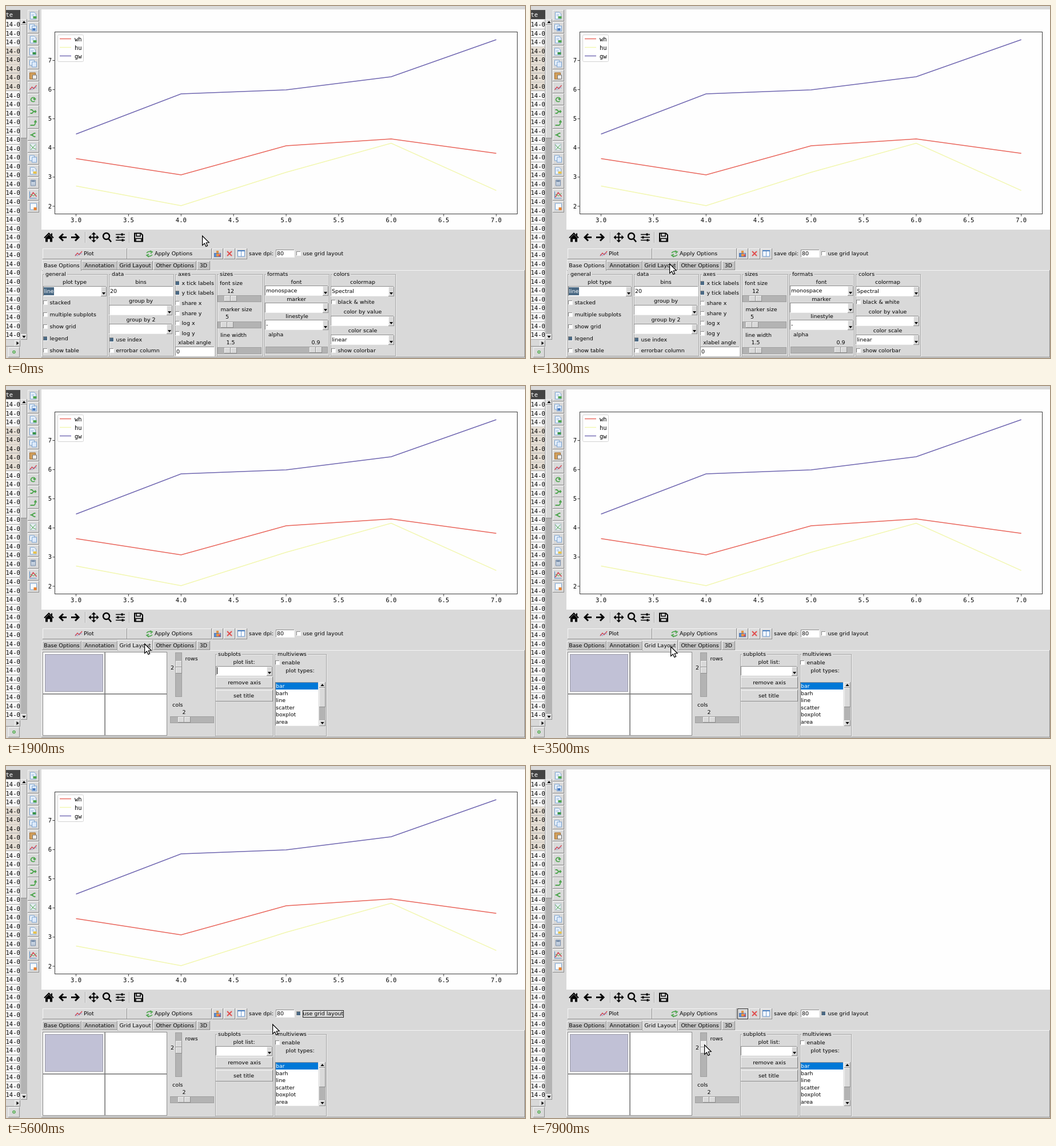
Animation, 908 px wide and 617 px high, one loop 8000 ms. Source, as an HTML page with a canvas:

```html
<!DOCTYPE html>
<html lang="en">
<head>
<meta charset="utf-8">
<title>Plot viewer</title>
<style>
html, body { margin: 0; width: 100%; height: 100%; overflow: hidden; background: #d9d9d9; }
canvas { display: block; }
</style>
</head>
<body>
<canvas id="stage" width="908" height="617"></canvas>
<script>
const g = document.getElementById('stage').getContext('2d');
const LOOP = 8000;
const GRAY = '#d9d9d9', HOVER = '#ececec', TROUGH = '#b3b3b3', DARK = '#8e8e8e', LIGHT = '#f4f4f4', BLUE = '#4a6984', GREEN = '#4fa64f';
const SANS = '9.45px "DejaVu Sans", sans-serif', MONO = '10.5px "DejaVu Sans Mono", monospace';

// Pointer positions: time, x, y; each holds until the next.
const pointer = [
  [0, 343, 402], [200, 341, 402], [600, 352, 412], [700, 378, 424], [800, 406, 434], [900, 404, 438],
  [1000, 375, 436], [1100, 330, 440], [1200, 280, 442], [1300, 242, 451], [3500, 244, 456], [4000, 248, 451],
  [4200, 416, 448], [4400, 489, 437], [4600, 523, 433], [4800, 528, 431], [5600, 466, 452], [5900, 416, 449],
  [6100, 388, 436], [6300, 371, 434], [6500, 374, 432], [7100, 366, 436], [7400, 303, 487], [7600, 304, 488],
  [7900, 303, 488]
];
let now = 0, mx = 0, my = 0;
const during = (a, b) => now >= a && now < b;
const over = (x, y, w, h) => mx >= x && mx < x + w && my >= y && my < y + h;

function rect(x, y, w, h, color) {
  g.fillStyle = color;
  g.fillRect(x, y, w, h);
}
function frame(x, y, w, h, color) {
  g.strokeStyle = color;
  g.lineWidth = 1;
  g.strokeRect(x + .5, y + .5, w - 1, h - 1);
}
function bevel(x, y, w, h, fill = GRAY, sunken = false) {
  rect(x, y, w, h, sunken ? LIGHT : DARK);
  rect(x, y, w - 1, h - 1, sunken ? DARK : LIGHT);
  rect(x + 1, y + 1, w - 2, h - 2, fill);
}
function text(s, x, y, align = 'left', color = '#000', font = SANS) {
  g.font = font;
  g.textAlign = align;
  g.fillStyle = color;
  g.fillText(s, x, y + (font === SANS ? 3 : 3.5));
}
const label = (s, x, y) => text(s, x, y, 'center');
function path(x, y, d, stroke, fill, width = 1) {
  const p = new Path2D(d);
  g.save();
  g.translate(x, y);
  g.lineWidth = width;
  if (fill) { g.fillStyle = fill; g.fill(p); }
  if (stroke) { g.strokeStyle = stroke; g.stroke(p); }
  g.restore();
}
const arrows = { up: 'M-3 2H3L0-2Z', down: 'M-3-2H3L0 2Z', right: 'M-2-3V3L2 0Z' };
const arrow = (dir, x, y) => path(x, y, arrows[dir], null, '#000');

function group(title, x, w) {
  frame(x + 1, 471, w, 144, '#ececec');
  frame(x, 470, w, 144, '#a6a6a6');
  g.font = SANS;
  rect(x + 3, 465, g.measureText(title).width + 4, 11, GRAY);
  text(title, x + 5, 470);
}
function entry(value, x, y, w, h) {
  bevel(x, y, w, h, '#fff', true);
  text(value, x + 2, y + h / 2);
}
function combo(value, x, y, w = 111, h = 18) {
  entry(value, x, y, w, h);
  bevel(x + w - 10, y + 1, 10, h - 1);
  arrow('down', x + w - 5, y + h - 5);
}
function check(name, x, y, on) {
  bevel(x - 4, y - 4, 8, 8, on ? BLUE : '#fff', true);
  text(name, x + 7.5, y);
}
function slider(x, y, w, pos) {
  rect(x, y, w, 12, TROUGH);
  frame(x, y, w, 12, '#a0a0a0');
  bevel(pos, y + 1, 11, 10);
  bevel(pos + 11, y + 1, 11, 10);
}

function table() {
  rect(0, 7, 25, 16, '#424242');
  text('te', -.5, 15, 'left', '#fff', MONO);
  rect(0, 24, 25, 561, '#f7f7f7');
  for (let i = 0; i < 36; i++) {
    const y = 24.7 + i * 15.54;
    if (i > 2 && i < 8) rect(0, y, 25, 15.5, '#e4ddd3');
    rect(0, Math.round(y + 15), 25, 1, '#aaa');
    text('14-0', -.5, y + 8, 'left', '#000', MONO);
  }
  rect(24, 24, 1, 560, '#aaa');
  rect(26, 23, 11, 562, TROUGH);
  bevel(26, 23, 11, 10);
  bevel(26, 33, 11, 199);
  bevel(26, 575, 11, 10);
  arrow('up', 31.5, 28);
  arrow('down', 31.5, 580);
  rect(0, 585, 25, 12, GRAY);
  rect(0, 596, 25, 1, DARK);
  bevel(15, 586, 10, 11);
  arrow('right', 20.5, 591);
  bevel(4, 598, 20, 18);
  path(14, 606.5, 'M-2 0A2 2 0 1 1 2 0A2 2 0 1 1-2 0', GREEN, '#d8ecd0', 1.5);
}

function page(x, y, accent) {
  path(x, y, 'M-5-6H2L5-3V6H-5Z', '#7ba4d2', '#edf4fc');
  path(x, y, 'M-3-2H2M-3 0H2', '#9dbbe0');
  rect(x, y + 1, 6, 4, accent);
}
function pages(x, y) {
  path(x, y, 'M-6-6H2V3H-6Z', '#7ba4d2', '#edf4fc');
  path(x, y, 'M-2-3H6V6H-2Z', '#7ba4d2', '#dce9fa');
}
function plotIcon(x, y) {
  path(x, y, 'M-6 4L-2-1 1 2 6-4', '#d8404c', null, 1.3);
  path(x, y, 'M-6 1L-2 4 2-1 6 1', '#7184c2', null, .8);
}
function barIcon(x, y) {
  rect(x - 6, y - 1, 4, 7, '#5b8fd0');
  rect(x - 2, y - 5, 4, 11, '#e49444');
  rect(x + 2, y + 1, 4, 5, '#d85959');
  frame(x - 6, y - 1, 12, 7, '#4c75b5');
}
const refresh = (x, y) => path(x, y, 'M-5-1Q-2-5 3-3M1-5L5-3 2 0M5 2Q1 6-3 4M-1 1L-5 3-1 6', GREEN, null, 1.7);
const greenIcon = d => (x, y) => path(x, y, d, GREEN, null, 1.8);
function chartPage(x, y) {
  path(x, y, 'M-5-6H5V6H-5Z', '#b4c0c9', '#e5edf2');
  path(x, y, 'M-5-4L0 2 5 4M-4 5L4-4', GREEN);
}
const toolIcons = [
  (x, y) => page(x, y, GREEN),
  (x, y) => { pages(x, y); rect(x - 1, y + 1, 5, 4, '#4778bd'); },
  (x, y) => page(x, y, GREEN),
  (x, y) => page(x - 1, y, '#37934a'),
  pages,
  (x, y) => { path(x, y, 'M-6-5H4V6H-6Z', '#a56e2e', '#d2a05c'); path(x, y, 'M-1-1H6V6H-1Z', '#777', '#eee'); },
  plotIcon,
  greenIcon('M3-3Q-3-5-4 0Q-3 5 3 3M0-1H4M2-3L4-1 2 1'),
  greenIcon('M-5-3H-2L1 0H5M-5 3H-2L1 0M3-2L5 0 3 2'),
  greenIcon('M-5 4H1Q4 4 4-3M2-1L4-4 6-1'),
  greenIcon('M4-3H2L-3 0 2 3H4M-5 0H0'),
  chartPage,
  pages,
  (x, y) => page(x, y, '#e7c34c'),
  (x, y) => {
    path(x, y, 'M-4-5H4V5H-4Z', '#7388a5', '#d7e1ed');
    rect(x - 3, y - 4, 6, 2, '#5f7898');
    path(x, y, 'M-3 0H3M-3 3H3', '#8fa1b9');
  },
  (x, y) => { path(x, y, 'M-6-6V6H6', '#5b8fc7'); path(x, y, 'M-5 4L0-4 6 3', '#d8404c', null, 1.5); path(x, y, 'M-5-1L1 2 6-3', GREEN); },
  (x, y) => { path(x, y, 'M-5-6H6V5H-5Z', '#7ba4d2', '#f7fafc'); rect(x + 1, y + 1, 5, 5, '#e98332'); }
];
function toolbar() {
  toolIcons.forEach((icon, i) => {
    const y = Math.round(17 + i * 20.94);
    bevel(38, y - 10, 20, 20);
    icon(47.5, y);
  });
}

const series = [
  ['wh', '#e9655b', [267.5, 296, 245, 233, 258.3]],
  ['hu', '#f2f7b0', [315.5, 350, 291.5, 240.5, 323.3]],
  ['gw', '#6f66b0', [224.5, 154, 147, 124, 59]]
];
function chart() {
  series.forEach(([, color, ys]) =>
    path(0, 0, 'M' + ys.map((y, i) => `${122.5 + i * 183.8} ${y}`).join('L'), color, null, 1.4));
  frame(85, 45, 810, 320, '#3c3c3c');
  for (let i = 0; i < 9; i++) {
    const x = 122.5 + i * 91.9;
    path(x, 365, 'M0 0V3.5', '#3c3c3c');
    text((3 + i / 2).toFixed(1), x, 375.5, 'center', '#000', MONO);
  }
  for (let v = 2; v < 8; v++) {
    const y = 351 - (v - 2) * 51.1;
    path(85, y, 'M0 0H-3.5', '#3c3c3c');
    text(v, 80, y, 'right', '#000', MONO);
  }
  path(90.5, 50.5, 'M2 0H43Q45 0 45 2V45Q45 47 43 47H2Q0 47 0 45V2Q0 0 2 0Z', '#d3d3d3', '#fff');
  series.forEach(([name, color], i) => {
    path(94, 57.5 + i * 15, 'M0 0H20', color, null, 1.4);
    text(name, 120, 58 + i * 15, 'left', '#000', MONO);
  });
}

function navigation() {
  const y = 405.5;
  path(75, y, 'M-8 1L0-7 8 1M5-7V-3', '#000', null, 2);
  path(75, y, 'M-6 1L0-5 6 1V8H2V3H-2V8H-6Z', null, '#000');
  path(99, y, 'M7 0H-5M1-6L-5 0 1 6', '#000', null, 3);
  path(121, y, 'M-7 0H6M0-6L6 0 0 6', '#000', null, 3);
  path(153.5, y, 'M-7 0H7M0-7V7', '#000', null, 2);
  path(153.5, y, 'M-9 0L-5-4V4ZM9 0L5-4V4ZM0-9L-4-5H4ZM0 9L-4 5H4Z', null, '#000');
  path(176, y, 'M5-2A5.5 5.5 0 1 1-6-2A5.5 5.5 0 1 1 5-2M3 2L8 8', '#000', null, 2.5);
  path(200, y, 'M-8-5H8M-8 0H8M-8 5H8', '#000', null, 1.7);
  path(200, y, 'M3-7V-3M-4-2V2M4 3V7', '#000', null, 3);
  path(232, y, 'M-7-7H4L7-4V7H-7Z', '#000', null, 2);
  path(232, y, 'M-4-7H3V-2H-4ZM-5 2H5V7H-5Z', '#000', GRAY, 1.5);
  for (const x of [138, 215]) { rect(x, 396, 1, 19, '#b0b0b0'); rect(x + 1, 396, 1, 19, '#ececec'); }
}

function button(x, w, pressed) {
  bevel(x, 425, w, 19, over(x, 425, w, 19) ? HOVER : GRAY, pressed);
}
function actions() {
  button(64, 148);
  plotIcon(127, 434);
  text('Plot', 136, 434);
  button(212, 148);
  refresh(251, 434);
  text('Apply Options', 260, 434);
  button(361, 19, during(6700, 6900));
  barIcon(370, 434);
  if (now >= 6700) frame(361, 425, 19, 19, '#333');
  button(381, 20);
  path(391, 434, 'M-4-4L4 4M4-4L-4 4', '#e05050', null, 2);
  button(402, 20);
  path(411.5, 434, 'M-6-5H6V5H-6ZM0-5V5', '#6f9bd0', '#f7faff');
  rect(405, 428, 13, 2, '#4e82c2');
  text('save dpi:', 425, 434);
  entry('80', 472, 427, 33, 14);
  if (over(508, 427, 84, 14)) rect(507, 427, 85, 14, HOVER);
  check('use grid layout', 512, 434, now >= 5400);
  if (during(5200, 6700)) frame(519, 428, 72, 13, '#222');
}

function tabs(selected) {
  const names = [['Base Options', 63, 69], ['Annotation', 132, 63], ['Grid Layout', 195, 62], ['Other Options', 258, 75], ['3D', 334, 23]];
  bevel(62, 463, 846, 153);
  names.forEach(([name, x, w], i) => {
    const on = i === selected;
    bevel(x, on ? 445 : 447, w, on ? 19 : 16, on ? GRAY : '#c3c3c3');
    if (on) rect(x + 1, 462, w - 2, 3, GRAY);
    label(name, x + w / 2, 455);
  });
}

function baseOptions() {
  group('general', 64, 114);
  label('plot type', 120, 484);
  combo('', 65, 491);
  rect(66, 493, 18, 14, BLUE);
  text('line', 66.5, 500, 'left', '#fff');
  ['stacked', 'multiple subplots', 'show grid', 'legend', 'show table'].forEach((s, i) => check(s, 69, Math.round(520.3 + i * 20.8), i === 3));

  group('data', 180, 114);
  label('bins', 236, 484);
  entry('20', 180, 491, 113, 18);
  label('group by', 236, 517);
  combo('', 180, 524);
  label('group by 2', 236, 549.5);
  combo('', 180, 557);
  check('use index', 185, 585, true);
  check('errorbar column', 185, 604);

  group('axes', 296, 71);
  ['x tick labels', 'y tick labels', 'share x', 'share y', 'log x', 'log y'].forEach((s, i) => check(s, 300, Math.round(485.6 + i * 17.7), i < 2));
  label('xlabel angle', 330, 590);
  entry('0', 296, 597, 69, 17);

  group('sizes', 369, 81);
  label('font size', 394, 486);
  label('12', 393, 499.5);
  slider(370, 507, 77, 382);
  label('marker size', 403, 531.5);
  label('5', 387, 544.5);
  slider(370, 553, 77, 376);
  label('line width', 398, 577);
  label('1.5', 393, 590);
  slider(370, 598, 77, 382);

  group('formats', 452, 114);
  label('font', 508, 484);
  combo('monospace', 453, 490);
  label('marker', 508, 513.5);
  combo('', 453, 520);
  label('linestyle', 509, 544);
  combo('-', 453, 550);
  text('alpha', 459, 576);
  label('0.9', 542, 589.5);
  slider(454, 597, 109, 531);

  group('colors', 568, 114);
  label('colormap', 624, 484);
  combo('Spectral', 568, 491);
  check('black & white', 573, 519);
  label('color by value', 624, 536);
  combo('', 568, 543);
  label('color scale', 624, 568.5);
  combo('linear', 568, 576);
  check('show colorbar', 573, 604);
}

function gridLayout() {
  rect(64, 466, 218, 147, '#8c8c8c');
  rect(65, 467, 216, 145, '#fff');
  rect(172.3, 467, 1.6, 145, '#777');
  rect(65, 539, 216, 1.6, '#777');
  rect(68, 470, 102, 66, '#c1c1d6');
  frame(68, 470, 102, 66, '#9a9aa6');

  label('2', 291, 494);
  rect(296, 467, 12, 78, TROUGH);
  frame(296, 467, 12, 78, '#a0a0a0');
  const handle = over(297, 482, 11, 22) ? HOVER : GRAY;
  bevel(297, 482, 11, 11, handle);
  bevel(297, 493, 11, 11, handle);
  text('rows', 313.5, 478);
  text('cols', 291, 559);
  label('2', 311.5, 572);
  slider(287, 579, 77, 301);

  group('subplots', 366, 102);
  label('plot list:', 416.5, 484);
  combo('', 367, 491, 99, 17);
  if (during(1900, 3500) || during(3800, 4400) || during(4800, 5200)) rect(369, 493, 1, 12, '#000');
  bevel(367, 510, 100, 20);
  label('remove axis', 417, 520);
  bevel(367, 533, 100, 20);
  label('set title', 416, 543);

  group('multiviews', 470, 91);
  check('enable', 475, 485);
  label('plot types:', 514.5, 499);
  bevel(471, 519, 76, 77, '#fff', true);
  rect(472, 520, 74, 12, '#0078d7');
  ['bar', 'barh', 'line', 'scatter', 'boxplot', 'area'].forEach((s, i) => text(s, 472, 526 + i * 12.5, 'left', i ? '#000' : '#fff'));
  rect(548, 519, 11, 77, TROUGH);
  bevel(548, 519, 11, 10);
  bevel(548, 529, 11, 34);
  bevel(548, 586, 11, 10);
  arrow('up', 553.5, 524);
  arrow('down', 553.5, 591);
}

function tooltip() {
  const tips = [[361, 19, 'clear figure', 444], [381, 20, 'close this panel', 484], [402, 20, 'change the view', 505]];
  for (const [x, w, tip, right] of tips) {
    if (!over(x, 425, w, 19)) continue;
    rect(x + 21, 445, right - x - 21, 17, '#ffffe0');
    frame(x + 21, 445, right - x - 21, 17, '#000');
    label(tip, (x + 21 + right) / 2, 453.5);
  }
}
function drawPointer() {
  if (over(472, 427, 33, 14)) path(mx, my, 'M-3-5.5H-1L0-4.5 1-5.5H3M0-5V4M-3 4.5H-1L0 3.5 1 4.5H3', '#000', null, 1.3);
  else path(mx, my, 'M.6 1V17.5L4.4 14 6.9 19.4 9.6 18.2 7.2 13 12.2 12.6Z', '#000', '#fff', 1.2);
}

function draw(time) {
  now = time % LOOP;
  [, mx, my] = pointer.findLast(p => p[0] <= now);
  if (during(1800, 1900)) {
    rect(0, 0, 908, 617, '#fefefe');
  } else {
    rect(0, 0, 908, 617, GRAY);
    table();
    toolbar();
    rect(62, 6, 846, 386, '#fefefe');
    if (now < 6900) chart();
    navigation();
    actions();
    tabs(now < 1900 ? 0 : 2);
    if (now < 1900) baseOptions(); else gridLayout();
    tooltip();
  }
  drawPointer();
}
const start = performance.now();
function tick() {
  draw(performance.now() - start);
  requestAnimationFrame(tick);
}
tick();
</script>
</body>
</html>
```
